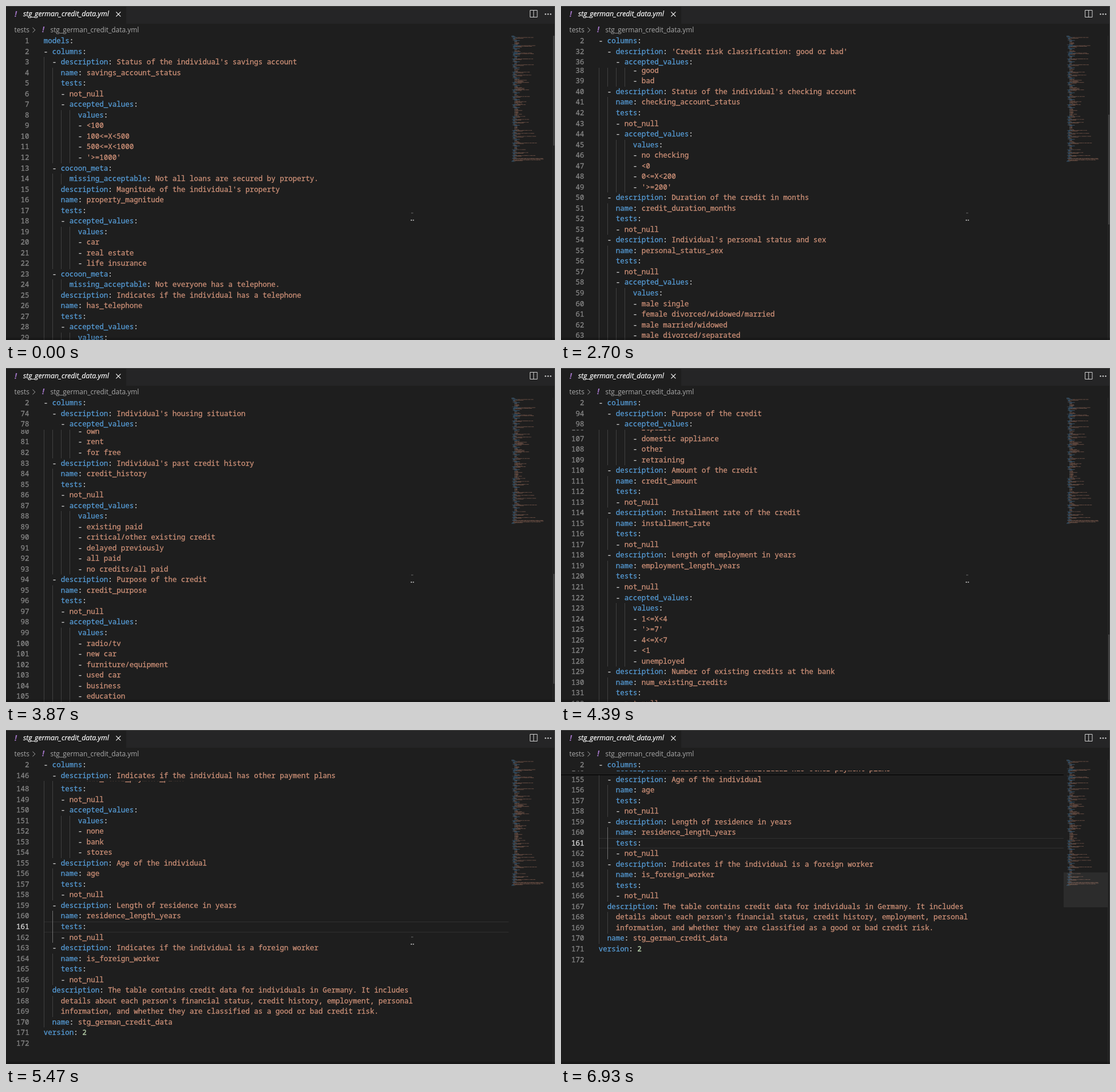
Write an HTML page with a canvas that moves like this. It is 959 by 584 pixels and loops after 7.1 s.

```html
<!DOCTYPE html>
<html lang="en">
<head>
<meta charset="utf-8">
<title>stg_german_credit_data.yml</title>
<style>
  html, body { margin: 0; width: 100%; height: 100%; overflow: hidden; background: #1e1e1e; }
  #stage { position: relative; width: 959px; height: 584px; overflow: hidden; background: #1e1e1e; }
  #stage *, #stage svg { position: absolute; }
  .ui { font: 11.9px/20px "Open Sans", "Noto Sans", sans-serif; color: #a9a9a9; white-space: pre; }
  .tab { font-size: 12.3px; font-style: italic; color: #fff; -webkit-text-stroke: .2px; }
  .bang { font-weight: 700; font-style: italic; font-size: 14px; color: #a074c4; }
  #tabs { left: 210px; top: 0; width: 749px; height: 30.7px; background: #252526; }
  #edge { inset: 0; border: solid #454545; border-width: 1px 1px 0 0; }
  #editor { left: 0; top: 52.2px; width: 878px; height: 531.8px; overflow: hidden; }
  #code, #sticky { left: 0; top: 0; width: 878px; }
  #sticky { overflow: hidden; }
  #rule { height: 1px; background: #000; }
  .line { left: 0; width: 878px; height: 18.53px; font: 12.51px/18.53px "Noto Sans Mono", "DejaVu Sans Mono", monospace; -webkit-text-stroke: .3px; }
  #sticky .line { background: #1e1e1e; }
  .num { right: 837.5px; color: #858585; }
  .text { left: 65.7px; white-space: pre; }
  #stage .text span { position: static; }
  .key { color: #569cd6; }
  .str { color: #ce9178; }
  .pun { color: #d4d4d4; }
  .val { color: #b5cea8; }
  .guide { top: 0; width: 1px; height: 18.6px; background: #404040; }
  .guide.on { background: #707070; }
  .now .num { color: #dcdcdc; }
  .now::before { content: ""; position: absolute; left: 66px; top: 0; right: 0; height: 18.53px; box-sizing: border-box; border: 1.5px solid #303030; border-right: 0; }
  #map { left: 878px; top: 52px; }
  #slider { left: 878px; top: 249px; width: 78px; height: 61px; background: rgba(121,121,121,.15); }
  #lane { left: 955px; top: 52px; width: 1px; height: 532px; background: #2a2a2a; }
  #thumb { left: 956px; width: 3px; height: 192px; background: #434343; }
  #foot { left: 0; top: 580px; width: 959px; height: 4px; background: rgba(0,0,0,.2); }
</style>
</head>
<body>
<div id="stage">
  <div id="tabs"></div>
  <div class="ui bang" style="left:15px;top:4px">!</div>
  <div class="ui tab" style="left:30px;top:4px">stg_german_credit_data.yml</div>
  <div class="ui" style="left:14.5px;top:31px">tests</div>
  <div class="ui bang" style="left:63px;top:31px">!</div>
  <div class="ui" style="left:77.5px;top:31px">stg_german_credit_data.yml</div>
  <svg width="959" height="52" style="left:0;top:0" fill="none" stroke="#d0d0d0">
    <path d="M192.3 10.3l8 8M200.3 10.3l-8 8" stroke="#fff" stroke-width="1.1"/>
    <path d="M46.5 37.8l4.4 4.2-4.4 4.2" stroke="#a9a9a9"/>
    <path d="M915.5 7.5h12.5v12h-12.5zM921.7 7.5v12"/>
    <g fill="#d0d0d0" stroke="none"><circle cx="942.4" cy="14.3" r="1.2"/><circle cx="946.9" cy="14.3" r="1.2"/><circle cx="951.4" cy="14.3" r="1.2"/></g>
  </svg>
  <div id="editor">
    <div id="code"></div>
    <div id="sticky"></div>
    <div id="rule"></div>
  </div>
  <canvas id="map" width="78" height="230"></canvas>
  <div id="slider"></div>
  <div id="lane"></div>
  <div id="edge"></div>
  <div id="thumb"></div>
  <div id="foot"></div>
  <svg id="beam" width="8" height="18" style="top:360px">
    <path id="stem" d="M3.5 3v12" stroke="#000" stroke-width="1.4"/>
    <path d="M1 2h1M3 2h1" stroke="#aaa"/>
    <path d="M0 14.5h2M3.5 14.5h2" stroke="#ddd" stroke-width="1.4"/>
  </svg>
  <svg id="arrow" width="9" height="12" style="left:945px;top:579px"><path d="M.5 .5v10l2.5-2.3h4z" fill="#fff" stroke="#000" stroke-width=".6"/></svg>
</div>
<script>
// The editor is shown at SCALE: 19px lines, 50px per wheel notch.
const SCALE = .9752, H = 19 * SCALE, NOTCH = 50 * SCALE;
const LOOP = 7100, CW = 7.506, CURRENT = 161;
const $ = id => document.getElementById(id);

// One YAML column entry; "!" after the name means it has no not_null test.
function column(desc, name, values, missing) {
  const nullable = name.endsWith("!");
  const out = missing ? ["  - cocoon_meta:", "      missing_acceptable: " + missing] : [];
  out.push((missing ? "    " : "  - ") + "description: " + desc,
    "    name: " + name.replace("!", ""), "    tests:");
  if (!nullable) out.push("    - not_null");
  if (values) out.push("    - accepted_values:", "        values:",
    ...values.split("|").map(v => "        - " + v));
  return out;
}

const doc = [
  "models:", "- columns:",
  ...column("Status of the individual's savings account", "savings_account_status", "<100|100<=X<500|500<=X<1000|'>=1000'"),
  ...column("Magnitude of the individual's property", "property_magnitude!", "car|real estate|life insurance", "Not all loans are secured by property."),
  ...column("Indicates if the individual has a telephone", "has_telephone!", "'yes'|'no'", "Not everyone has a telephone."),
  ...column("'Credit risk classification: good or bad'", "credit_risk_class", "good|bad"),
  ...column("Status of the individual's checking account", "checking_account_status", "no checking|<0|0<=X<200|'>=200'"),
  ...column("Duration of the credit in months", "credit_duration_months"),
  ...column("Individual's personal status and sex", "personal_status_sex", "male single|female divorced/widowed/married|male married/widowed|male divorced/separated"),
  ...column("Individual's job qualification", "job_qualification", "skilled|unskilled resident|high qualif/self emp/mgmt|unemp/unskilled non res"),
  ...column("Individual's housing situation", "housing_situation", "own|rent|for free"),
  ...column("Individual's past credit history", "credit_history", "existing paid|critical/other existing credit|delayed previously|all paid|no credits/all paid"),
  ...column("Purpose of the credit", "credit_purpose", "radio/tv|new car|furniture/equipment|used car|business|education|repairs|domestic appliance|other|retraining"),
  ...column("Amount of the credit", "credit_amount"),
  ...column("Installment rate of the credit", "installment_rate"),
  ...column("Length of employment in years", "employment_length_years", "1<=X<4|'>=7'|4<=X<7|<1|unemployed"),
  ...column("Number of existing credits at the bank", "num_existing_credits"),
  ...column("Number of people dependent on the individual", "num_dependents"),
  ...column("Indicates if there is a co-applicant or guarantor", "other_parties_involved", "none|guarantor|co applicant"),
  ...column("Indicates if the individual has other payment plans", "has_other_payment_plans", "none|bank|stores"),
  ...column("Age of the individual", "age"),
  ...column("Length of residence in years", "residence_length_years"),
  ...column("Indicates if the individual is a foreign worker", "is_foreign_worker"),
  "  description: The table contains credit data for individuals in Germany. It includes",
  "    details about each person's financial status, credit history, employment, personal",
  "    information, and whether they are classified as a good or bad credit risk.",
  "  name: stg_german_credit_data", "version: 2", ""
];

const indents = doc.map(s => s.search(/\S|$/));
const ends = indents.map((n, i) => {
  let j = i;
  while (j + 1 < doc.length && indents[j + 1] > n) j++;
  return j;
});

function tokens(s) {
  const [, pad, dash = "", key = "", colon = "", rest] = s.match(/^(\s*)(- )?(?:(\w+)(:))?(.*)$/);
  return [[pad + dash, "pun"], [key, "key"], [colon, "pun"], [rest, /^ \d+$/.test(rest) ? "val" : "str"]]
    .filter(t => t[0]);
}

function add(parent, tag, cls, text = "") {
  const el = document.createElement(tag);
  el.className = cls;
  el.textContent = text;
  parent.appendChild(el);
  return el;
}

function addLine(parent, i, y) {
  const row = add(parent, "div", "line");
  row.style.top = y + "px";
  add(row, "div", "num", i + 1);
  const text = add(row, "div", "text");
  for (const [s, cls] of tokens(doc[i])) add(text, "span", cls, s);
  return row;
}

doc.forEach((s, i) => {
  const row = addLine($("code"), i, i * H);
  if (i + 1 === CURRENT) row.classList.add("now");
  for (let c = 0; c < indents[i]; c += 2) {
    const active = c === 2 && Math.abs(i + 1 - CURRENT) < 2;
    add(row, "div", active ? "guide on" : "guide").style.left = Math.round(66 + c * CW) + "px";
  }
});

function drawMap() {
  const g = $("map").getContext("2d");
  const tint = { key: "#569cd6", str: "#ce9178", pun: "#d4d4d4", val: "#b5cea8" };
  g.globalAlpha = .45;
  doc.forEach((s, i) => {
    let col = 0;
    for (const [part, cls] of tokens(s)) {
      g.fillStyle = tint[cls];
      for (const m of part.matchAll(/\S+/g))
        g.fillRect(5 + (col + m.index) * .65, i * 1.29, m[0].length * .65, .9);
      col += part.length;
    }
  });
}
drawMap();

// [time, wheel notches scrolled so far]
const wheel = [[0, 0], [1650, 5], [2050, 9], [2700, 13], [2950, 17], [3070, 20], [3630, 23], [3750, 26],
  [3870, 29], [4020, 34], [4390, 39], [4670, 44], [4790, 48], [5350, 52], [5470, 55], [5590, 57], [5710, 58]];

// Enclosing scopes stay at the top; the last one is pushed out by its end.
function drawSticky(scroll) {
  const box = $("sticky"), rows = [];
  let shift = 0;
  for (let i = 0; i < doc.length; i++) {
    const y = rows.length * H, bottom = (ends[i] + 1) * H - scroll;
    if (rows.length && i > ends[rows[rows.length - 1]]) break;
    if (ends[i] === i || i * H - scroll >= y || bottom < y) continue;
    rows.push(i);
    shift = Math.min(0, bottom - y - H);
    if (shift) break;
  }
  box.textContent = "";
  rows.forEach((i, d) => {
    const last = d === rows.length - 1;
    addLine(box, i, d * H + (last ? shift : 0)).style.zIndex = 9 - d;
  });
  const height = rows.length * H + shift;
  box.style.height = height + "px";
  return height;
}

let shown = -1, stickyBottom = 0;
function scrollTo(notches) {
  if (notches === shown) return;
  shown = notches;
  const scroll = notches * NOTCH;
  $("code").style.top = -scroll + "px";
  $("thumb").style.top = 52 + scroll * .2177 + "px";
  stickyBottom = drawSticky(scroll);
}

function show(id, on) { $(id).style.visibility = on ? "visible" : "hidden"; }

function render(t) {
  scrollTo(wheel.filter(w => w[0] <= t).pop()[1]);

  const stub = t >= 2050 && t < 3630;
  const rule = $("rule").style;
  rule.left = t >= 5710 ? "0" : "2px";
  rule.width = stub ? "23px" : "878px";
  rule.top = (stub ? 2 * H : stickyBottom) + "px";
  show("rule", t >= 1650 && t < 3630 || t >= 5710);

  $("beam").style.left = t < 6270 ? "707px" : "723px";
  show("beam", t < 6420);
  show("stem", t >= 1650 && t < 2050);
  show("arrow", t >= 6810 && t < 6930);
  $("slider").style.opacity = t < 6420 ? 0 : Math.min(3, Math.floor((t - 6300) / 120)) / 3;
}

const start = performance.now();
function tick() {
  render((performance.now() - start) % LOOP);
  requestAnimationFrame(tick);
}
tick();
</script>
</body>
</html>
```
